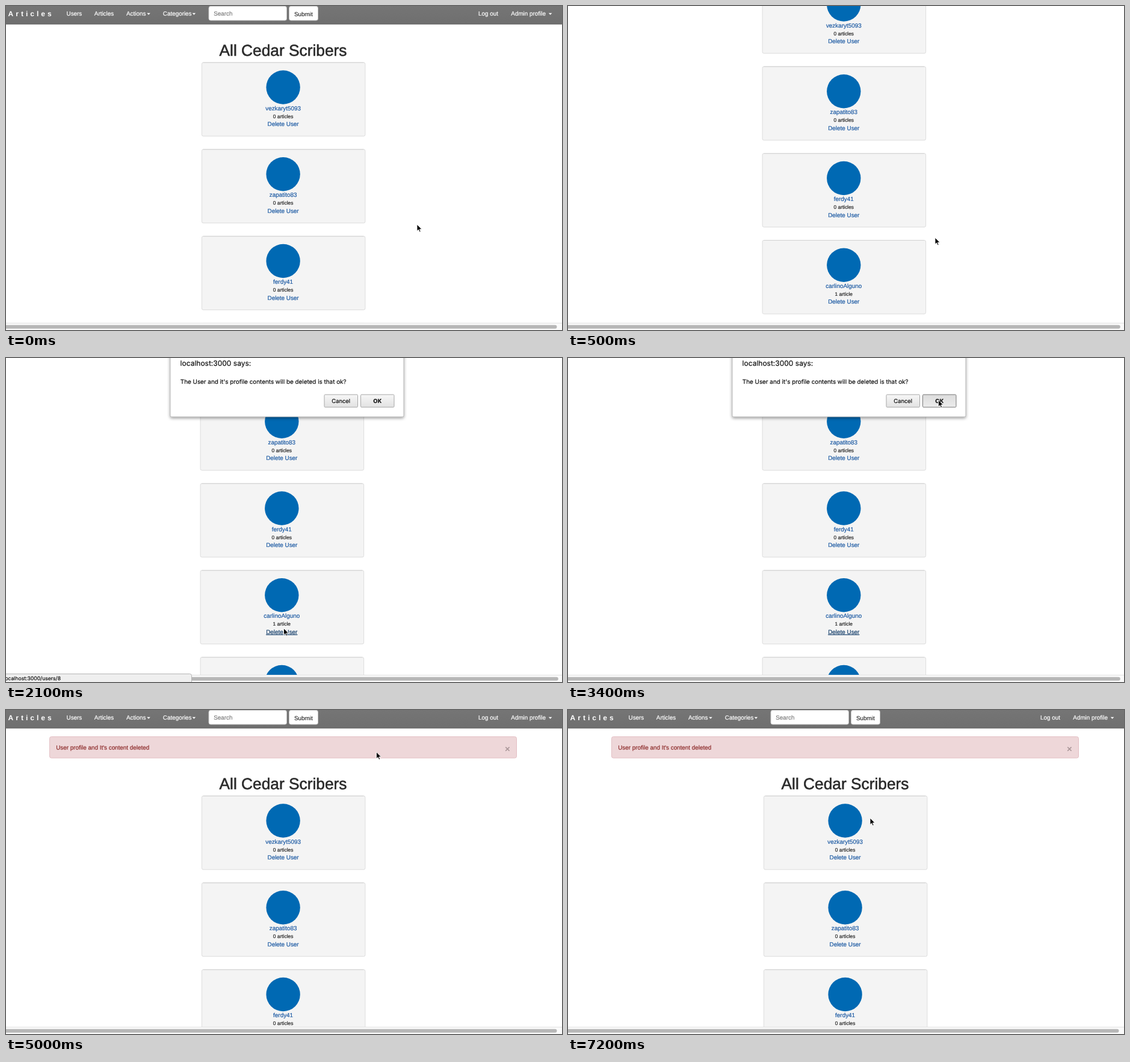
Recreate the animation shown at these times as an HTML page. Size 924 by 540 pixels, loop 7300 ms.

```html
<!DOCTYPE html>
<html lang="en">
<head>
<meta charset="utf-8">
<style>
html, body { margin: 0; width: 100%; height: 100%; overflow: hidden; background: #fff; }
svg { display: block; width: 924px; height: 540px; }
text { font: 9.9px "Liberation Sans", Arial, sans-serif; text-rendering: geometricPrecision; white-space: pre; stroke-width: .2; }
.mid { text-anchor: middle; }
.end { text-anchor: end; }
.link { fill: #1c5aa3; stroke: #1c5aa3; }
.link.hover { fill: #17406c; stroke: #17406c; text-decoration: underline; }
.small { font-size: 8.4px; fill: #222; stroke: #222; }
.title { font-size: 26.3px; fill: #2b2b2b; stroke: #2b2b2b; stroke-width: .6; }
.nav { fill: #fff; stroke: #fff; }
.brand { font-size: 12px; font-weight: bold; letter-spacing: 4px; fill: #fff; }
.hint { fill: #808080; stroke: #808080; }
.warn { fill: #8d2c2b; stroke: #8d2c2b; }
.close { font-size: 15px; font-weight: bold; fill: #aa9799; }
.ui { font-family: Inter, Roboto, sans-serif; fill: #111; stroke: #111; }
</style>
</head>
<body>
<svg id="stage" viewBox="0 0 924 540" xmlns="http://www.w3.org/2000/svg">
  <defs>
    <linearGradient id="bar" x2="0" y2="1">
      <stop stop-color="#757575"/><stop offset="1" stop-color="#6f6f6f"/>
    </linearGradient>
    <linearGradient id="button" x2="0" y2="1">
      <stop stop-color="#f7f7f7"/><stop offset="1" stop-color="#e2e2e2"/>
    </linearGradient>
    <linearGradient id="pressed" x2="0" y2="1">
      <stop stop-color="#dcdcdc"/><stop offset="1" stop-color="#ececec"/>
    </linearGradient>
    <filter id="shadow" x="-5%" y="-20%" width="110%" height="150%">
      <feDropShadow dx="0" dy="2" stdDeviation="2.5" flood-opacity=".4"/>
    </filter>
    <clipPath id="view"><rect width="924" height="528.5"/></clipPath>
  </defs>
  <rect width="924" height="540" fill="#fff"/>
  <g clip-path="url(#view)">
    <g id="page">
      <g id="nav"></g>
      <g id="alert">
        <rect x="72.5" y="44.5" width="776" height="35.5" rx="3" fill="#eed7d9" stroke="#e3bfc4"/>
        <text class="warn" x="83.2" y="66.4">User profile and It's content deleted</text>
        <text class="close mid" x="833.4" y="69.5">×</text>
      </g>
      <g id="list"></g>
    </g>
  </g>
  <rect y="528" width="924" height="12" fill="#fafafa"/>
  <rect y="528" width="924" height="1" fill="#e2e2e2"/>
  <rect id="thumb" x="-8" y="531.7" height="6" rx="3" fill="#b7b7b7"/>
  <g id="status">
    <path d="M-2 526.5H305.5q3 0 3 3V542H-2z" fill="#efefef" stroke="#b4b4b4"/>
    <text class="ui end" x="91" y="536.5" style="font-size:8.6px">localhost:3000/users/8</text>
  </g>
  <g id="dialog">
    <rect x="273" y="-20" width="388" height="118" rx="2" fill="#fff" stroke="#a8a8a8" stroke-width=".8" filter="url(#shadow)"/>
    <text class="ui" x="289.6" y="13.4" style="font-size:12px">localhost:3000 says:</text>
    <text class="ui" x="289.8" y="42.8" style="font-size:9.88px">The User and it's profile contents will be deleted is that ok?</text>
    <rect x="529" y="61" width="55.5" height="21" rx="1.5" fill="url(#button)" stroke="#a6a6a6"/>
    <text class="ui mid" x="556.7" y="75.2" style="font-size:9.4px">Cancel</text>
    <rect id="ok" x="589.5" y="61" width="55.5" height="21" rx="1.5"/>
    <text class="ui mid" x="617.2" y="75.2" style="font-size:9.4px;font-weight:bold">OK</text>
  </g>
  <g id="arrow">
    <path d="M0 0V11.2L2.6 8.8 4.4 12.8 6.2 12 4.5 8.1H8z" fill="#000" stroke="#fff" stroke-width=".9" stroke-linejoin="round"/>
  </g>
  <g id="hand">
    <path d="M-1.2 6.5V1Q-1 0 0 0T1.2 1V4.5Q2.5 3.6 3.2 5 4.5 4.3 5 5.6 6.5 5.2 6.6 6.8V9.5L5.5 13H-1L-4 8.4Q-4.6 6.8-3.2 6.8L-1.2 8.5zM1.2 4.5V6.5M3.2 5V7M5 5.6V7.5" fill="#fff" stroke="#111" stroke-width=".9" stroke-linejoin="round"/>
  </g>
</svg>
<script>
const LOOP = 7300, STEP = 100;
const $ = id => document.getElementById(id);
const names = ["vezkaryt5093", "zapatito83", "ferdy41", "carlinoAlguno", ""];

const label = (x, y, s, cls) => `<text x="${x}" y="${y}" class="${cls}">${s}</text>`;
const caret = x => `<path d="M${x} 11.8h5.6l-2.8 3z" fill="#fff"/>`;
const field = (x, w) =>
  `<rect x="${x}" y=".5" width="${w}" height="23.5" rx="3" fill="#fff" stroke="#c4c4c4"/>`;

$("nav").innerHTML =
  `<rect width="930" height="30.5" fill="url(#bar)"/><rect y="29.5" width="930" height="1" fill="#626262"/>` +
  label(3.6, 17, "Articles", "brand") +
  label(100.5, 15.8, "Users", "nav") +
  label(146.8, 15.8, "Articles", "nav") +
  label(200, 15.8, "Actions", "nav") + caret(234.2) +
  label(260.8, 15.8, "Categories", "nav") + caret(309.6) +
  field(337, 129.5) + label(345.2, 16, "Search", "hint") +
  field(470.5, 48) + label(494.4, 16.6, "Submit", "mid") +
  label(785, 15.8, "Log out", "nav") +
  label(839.3, 15.8, "Admin profile", "nav") + caret(901.8);

function card(name, i) {
  const y = 94 + i * 144.75;
  return `<g transform="translate(325 ${y})">
    <rect x=".4" y=".2" width="271.5" height="122.7" rx="2.5" fill="#f4f4f4" stroke="#dcdcdc"/>
    <path d="M2.5 .3H269.5" stroke="#d3d3d3"/>
    <circle cx="135.6" cy="41.5" r="28.2" fill="#0069b3"/>` +
    label(135.6, 79.6, name, "link mid") +
    label(135.6, 92.7, i === 3 ? "1 article" : "0 articles", "small mid") +
    label(135.6, 106, "Delete User", "link mid del") + "</g>";
}
$("list").innerHTML = label(460.5, 82.7, "All Cedar Scribers", "title mid") + names.map(card).join("");
const target = document.querySelectorAll(".del")[3];

// Linear blend through rows of [time, ...values]
function track(rows, t) {
  let i = 0;
  while (i < rows.length - 2 && t >= rows[i + 1][0]) i++;
  const [a, b] = [rows[i], rows[i + 1]];
  const k = Math.min(1, Math.max(0, (t - a[0]) / (b[0] - a[0])));
  return a.slice(1).map((v, j) => v + (b[j + 1] - v) * k);
}

const scroll = [[0, 0, 0], [100, 15, 1], [300, 79.5, 2.3], [500, 138, 2.3], [700, 170, 2.3], [800, 174.5, 2.3]];
const pointer = [
  [0, 683, 364], [300, 681.3, 371.3], [500, 610, 386], [700, 510, 412], [900, 470, 427],
  [1200, 456, 434.3], [1400, 458, 440], [1600, 461.5, 450.5], [2400, 461.5, 450.5],
  [2700, 500, 330], [3000, 575, 130], [3200, 602, 78], [3300, 615.5, 70],
  [5200, 615.5, 70], [5600, 598, 88], [6100, 545, 143], [6600, 508, 176], [6900, 502, 180]
];

const show = (id, on) => $(id).setAttribute("visibility", on ? "visible" : "hidden");
const move = (id, x, y) => $(id).setAttribute("transform", `translate(${x} ${y})`);

function draw(t) {
  const within = (a, b) => t >= a && t < b;
  const done = t >= 4500;
  const [sy, sx] = done ? [0, 0] : track(scroll, t);
  const [x, y] = track(pointer, t);
  const dialog = within(1900, 3600), hand = within(1000, 1900), press = within(3400, 3600);

  move("page", -sx, -sy);
  move("list", 0, done ? 49 : 0);
  show("alert", done);
  $("thumb").setAttribute("width", 923.5 + sx);
  target.classList.toggle("hover", within(1500, 3700));
  show("status", within(1000, 2700));
  show("dialog", dialog);
  $("ok").setAttribute("fill", press ? "url(#pressed)" : "url(#button)");
  $("ok").setAttribute("stroke", press ? "#777" : "#a6a6a6");
  show("arrow", !hand);
  show("hand", hand);
  move(hand ? "hand" : "arrow", x, y);
}

const start = performance.now();
function tick() {
  const t = (performance.now() - start) % LOOP;
  draw(Math.floor(t / STEP) * STEP);
  requestAnimationFrame(tick);
}
draw(0);
requestAnimationFrame(tick);
</script>
</body>
</html>
```
